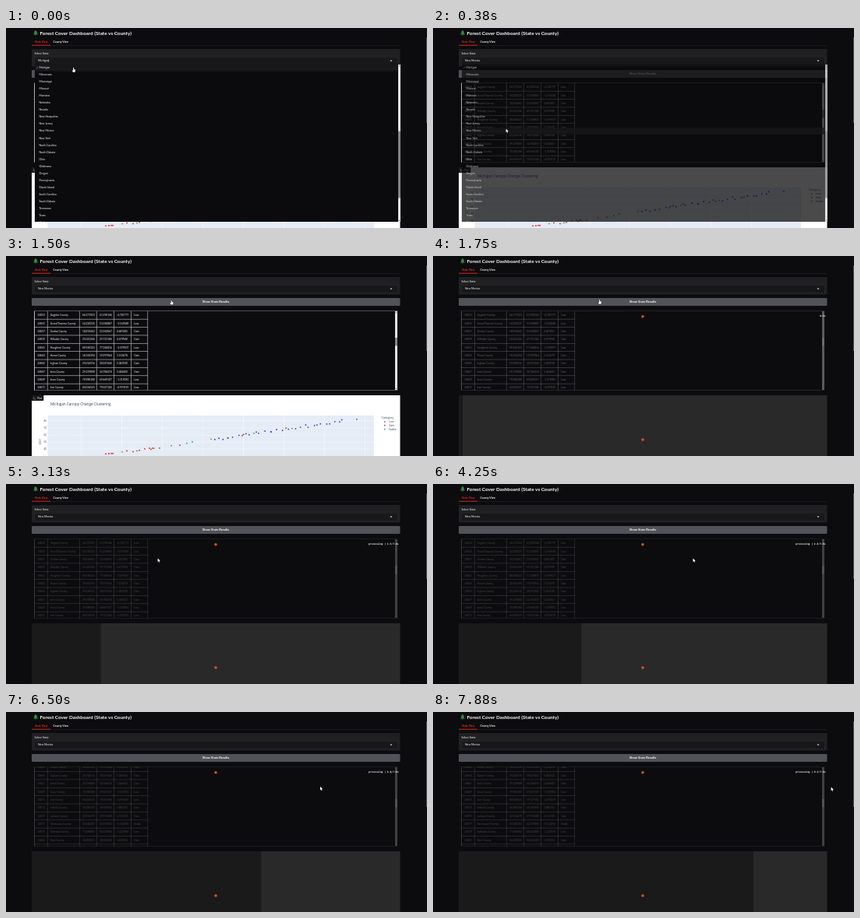
Animation, 540 px wide and 257 px high, one loop 8 s. Source, as an HTML page with a canvas:

```html
<!DOCTYPE html>
<html lang="en">
<head>
<meta charset="utf-8">
<title>Forest Cover Dashboard</title>
<style>
html, body { margin: 0; width: 100%; height: 100%; overflow: hidden; background: #0c0c0f; }
canvas { display: block; width: 540px; height: 257px; }
</style>
</head>
<body>
<canvas id="stage"></canvas>
<script>
const W = 540, H = 257, LOOP = 8000, STEP = 125;
const START = 1667, ETA = 7.76;
const UI = 'Lato, "Open Sans", sans-serif';
const CHART = '"Open Sans", sans-serif';
const MONO = '"DejaVu Sans Mono", "Liberation Mono", monospace';

const canvas = document.getElementById('stage');
const ratio = window.devicePixelRatio || 1;
canvas.width = W * ratio;
canvas.height = H * ratio;
const ctx = canvas.getContext('2d');

const states = ['Michigan', 'Minnesota', 'Mississippi', 'Missouri', 'Montana', 'Nebraska',
  'Nevada', 'New Hampshire', 'New Jersey', 'New Mexico', 'New York', 'North Carolina',
  'North Dakota', 'Ohio', 'Oklahoma', 'Oregon', 'Pennsylvania', 'Rhode Island',
  'South Carolina', 'South Dakota', 'Tennessee', 'Texas', 'Utah'];

// county, cover before, cover after
const counties = [
  ['Gogebic', 66.371923, 61.590146], ['Grand Traverse', 54.220235, 51.050887],
  ['Gratiot', 18.874662, 23.562067], ['Hillsdale', 25.041246, 29.721186],
  ['Houghton', 80.960323, 77.360816], ['Huron', 18.163394, 19.297064],
  ['Ingham', 25.014516, 30.057446], ['Ionia', 29.339808, 34.784410],
  ['Iosco', 70.988188, 69.669107], ['Iron', 84.034525, 79.037106],
  ['Isabella', 34.280194, 38.160946], ['Jackson', 32.916470, 37.071680],
  ['Kalamazoo', 42.260301, 42.097805], ['Kalkaska', 71.446802, 68.223806],
  ['Kent', 36.402815, 38.042648], ['Keweenaw', 86.134210, 83.520164]
];

// time, x, y of the pointer
const path = [
  [0, 87, 54], [125, 88, 66], [375, 95, 132], [625, 124, 137], [875, 142, 122],
  [1375, 212, 60], [1750, 214, 59], [2000, 214, 60], [2500, 196, 98], [3625, 196, 98],
  [4375, 346, 98], [6250, 346, 98], [6875, 512, 99], [8000, 512, 99]
];

function random(seed) {
  return () => (seed = (seed * 16807) % 2147483647) / 2147483647;
}

const dots = (() => {
  const rnd = random(77), list = [];
  const add = (x, color, spread) => list.push({
    x, y: 255.5 - (x - 128) * 0.143 + (rnd() - 0.5) * spread, color
  });
  [128, 132, 135, 137, 155, 163, 171, 178, 184, 186, 188, 197, 223, 303].forEach(x => add(x, '#e8202a', 2.5));
  [149, 168, 190, 212, 232, 239, 263, 285, 318, 367].forEach(x => add(x, '#22b14c', 2.5));
  for (let i = 0; i < 30; i++) add(267 + 168 * (i + rnd()) / 30, '#3c3cd2', 3.5);
  add(450, '#3c3cd2', 1);
  return list;
})();

const clamp = v => Math.max(0, Math.min(1, v));
const ease = v => v * v * (3 - 2 * v);

function rect(x, y, w, h, color) {
  ctx.fillStyle = color;
  ctx.fillRect(x, y, w, h);
}

function round(x, y, w, h, r, color) {
  ctx.fillStyle = color;
  ctx.beginPath();
  ctx.roundRect(x, y, w, h, r);
  ctx.fill();
}

function circle(x, y, r, color) {
  ctx.fillStyle = color;
  ctx.beginPath();
  ctx.arc(x, y, r, 0, Math.PI * 2);
  ctx.fill();
}

function poly(points, color, line) {
  ctx.beginPath();
  points.forEach(([x, y]) => ctx.lineTo(x, y));
  ctx.closePath();
  if (line) {
    ctx.strokeStyle = line;
    ctx.lineWidth = 0.8;
    ctx.stroke();
  }
  ctx.fillStyle = color;
  ctx.fill();
}

// y is the middle of the capitals
function text(str, x, y, size, color = '#f4f4f5', { weight = 400, font = UI, align = 'left' } = {}) {
  ctx.font = `${weight} ${size}px ${font}`;
  ctx.textAlign = align;
  ctx.fillStyle = color;
  ctx.fillText(str, x, y + size * 0.35);
}

function scrollbar(x, top, bottom, thumb, size) {
  rect(x, top, 3, bottom - top, '#e4e4e6');
  rect(x, thumb, 3, size, '#858588');
  poly([[x + 0.5, top + 2.3], [x + 2.5, top + 2.3], [x + 1.5, top + 1]], '#555');
  poly([[x + 0.5, bottom - 2.3], [x + 2.5, bottom - 2.3], [x + 1.5, bottom - 1]], '#555');
}

function header(value) {
  poly([[38, 2.8], [40.4, 6], [39.2, 6], [41, 8.6], [35, 8.6], [36.8, 6], [35.6, 6]], '#2f8f3a');
  rect(37.5, 8.6, 1, 1.2, '#7a4a24');
  text('Forest Cover Dashboard (State vs County)', 43.5, 6.5, 6.35, '#fafafa', { weight: 700 });
  text('State View', 37, 18, 3.4, '#ef2b1d', { weight: 700 });
  text('County View', 60.5, 18, 3.4, '#f4f4f5', { weight: 700 });
  rect(33, 22, 472, 0.5, '#29292d');
  rect(33, 21.7, 24, 0.9, '#e0261b');
  round(33, 27, 472.5, 22.5, 1, '#202023');
  text('Select State', 36.5, 32.3, 3.5);
  round(36.5, 37, 466, 10.3, 1, '#2c2c30');
  round(36.9, 37.4, 465.2, 9.5, 1, '#18181b');
  text(value, 41, 42.1, 3.5);
  poly([[492.7, 41.5], [495.3, 41.5], [494, 43.2]], '#f4f4f5');
  rect(539, 12, 1, 110, '#55555a');
}

function button() {
  round(33, 54, 472.5, 10, 1, '#52525b');
  text('Show State Results', 269.2, 59, 4.05, '#fff', { weight: 700, align: 'center' });
}

function table(scroll, alpha) {
  const rowH = 10.37, top = 70.7, bottom = 172.3;
  ctx.save();
  ctx.globalAlpha = alpha;
  ctx.beginPath();
  ctx.rect(36, 70.3, 467.5, 102.4);
  ctx.clip();
  const line = '#c4c4c8';
  counties.forEach(([name, before, after], i) => {
    const y = 76 + i * rowH - scroll, diff = after - before;
    const kind = Math.abs(diff) < 0.5 ? 'Stable' : diff < 0 ? 'Loss' : 'Gain';
    const cells = [26053 + 2 * i, name + ' County', before.toFixed(6), after.toFixed(6), diff.toFixed(6), kind];
    [40.5, 56.7, 98, 120, 142, 164.3].forEach((x, c) => text(String(cells[c]), x, y, 3.25));
    rect(36.5, y + rowH / 2 - 0.3, 145.5, 0.6, line);
  });
  [53.2, 94.2, 116.2, 138.7, 160.5, 181.8].forEach(x => rect(x - 0.3, top, 0.6, 102, line));
  rect(36.2, top, 0.8, 102, '#e8e8ea');
  rect(36.2, top - 0.3, 466, 0.5, line);
  rect(36.2, bottom - 0.3, 466, 0.5, line);
  scrollbar(499, 71, 172, 105 + scroll * 0.12, 10.5);
  ctx.restore();
}

function plot() {
  rect(33, 179, 472.5, 78, '#fff');
  rect(53.5, 205, 418.5, 52, '#e5ecf6');
  for (let i = 0; i < 5; i++) {
    const y = 212 + i * 9;
    rect(53.5, y - 0.2, 418.5, 0.4, '#fff');
    text(String(80 - i * 10), 52, y, 3, '#2a3f5f', { font: CHART, align: 'right' });
  }
  for (let x = 96; x < 470; x += 52) rect(x, 205, 0.4, 52, '#fff');
  dots.forEach(d => circle(d.x, d.y, 0.9, d.color));
  text('Michigan Canopy Change Clustering', 57, 190, 4.65, '#2a3f5f', { font: CHART });
  ctx.save();
  ctx.translate(43.7, 238.5);
  ctx.rotate(-Math.PI / 2);
  text('2021', 0, 0, 3.4, '#2a3f5f', { font: CHART, align: 'center' });
  ctx.restore();
  text('Category', 481.5, 207.8, 3.75, '#2a3f5f', { font: CHART });
  [['Loss', '#3c3cd2'], ['Gain', '#e8202a'], ['Stable', '#22b14c']].forEach(([name, color], i) => {
    circle(485.7, 213 + i * 4.7, 0.85, color);
    text(name, 491, 213 + i * 4.7, 3.3, '#2a3f5f', { font: CHART });
  });
  round(33, 179, 15.3, 7, [0, 0, 1, 0], '#18181b');
  ctx.strokeStyle = '#d4d4d8';
  ctx.lineWidth = 0.4;
  ctx.beginPath();
  ctx.moveTo(35.7, 181);
  ctx.lineTo(35.7, 184);
  ctx.lineTo(38.3, 184);
  ctx.stroke();
  text('Plot', 40.3, 182.5, 3.2);
}

function progress(time) {
  const spent = (time - START) / 1000;
  rect(33, 179, 472.5, 78, '#29292a');
  rect(33, 179, 472.5 * clamp(spent / ETA), 78, '#1a1a1b');
  const label = spent < 0.15 ? `${spent.toFixed(1)}s` : `processing | ${spent.toFixed(1)}/${ETA.toFixed(1)}s`;
  text(label, 503.5, 77, 3.05, '#fff', { font: MONO, align: 'right', weight: 700 });
  circle(269, 77.8, 1.8, '#d9531e');
  circle(269, 236, 1.8, '#d9531e');
}

function menu(alpha, active) {
  ctx.save();
  ctx.globalAlpha = alpha;
  // drawn as non-overlapping areas, so that fading stays even
  ctx.beginPath();
  ctx.rect(36.7, 46.6, 469.5, 202.4);
  ctx.clip();
  rect(36.7, 46.6, 466.3, 202.4, '#0b0b0d');
  rect(36.7, 46.6 + active * 9.02, 466.3, 9, '#18181a');
  states.forEach((name, i) => text(name, 42.5, 51.1 + i * 9.02, 3.45));
  text('✓', 38.8, 51.1, 3.3, '#f4f4f5', { font: '"DejaVu Sans", sans-serif' });
  scrollbar(503, 47, 249, 132.5, 86);
  ctx.restore();
}

function pointerAt(time) {
  let i = 1;
  while (i < path.length - 1 && path[i][0] <= time) i++;
  const [t0, x0, y0] = path[i - 1], [t1, x1, y1] = path[i];
  const p = ease(clamp((time - t0) / (t1 - t0)));
  return [x0 + (x1 - x0) * p, y0 + (y1 - y0) * p];
}

function pointer(time) {
  const [x, y] = pointerAt(time);
  const hand = time < 375 || (time > 1200 && time < 2200);
  const shape = hand
    ? [[-0.9, -3], [0, -3], [0.2, -1], [1.8, -0.5], [2, 1.2], [1.3, 2.8], [-1, 2.8], [-2.2, 0.7], [-1.8, 0.2], [-0.9, 0.8]]
    : [[-1.4, -2.6], [-1.4, 2], [-0.4, 1.2], [0.4, 2.8], [1.1, 2.5], [0.4, 0.9], [1.8, 0.8]];
  poly(shape.map(([dx, dy]) => [x + dx, y + dy]), '#fff', '#111');
}

function draw(now) {
  const time = Math.floor((now % LOOP) / STEP) * STEP;
  const busy = time >= START;
  const scroll = 56.5 * ease(clamp((time - 5500) / 600));
  const fade = time < 375 ? 1 : time < 500 ? 0.74 : time < 625 ? 0.25 : 0;

  ctx.setTransform(ratio, 0, 0, ratio, 0, 0);
  rect(0, 0, W, H, '#0c0c0f');
  header(time < 375 ? 'Michigan' : 'New Mexico');
  button();
  table(scroll, !busy ? 1 : time < 1875 ? 0.36 : 0.24);
  if (busy) progress(time);
  else plot();
  if (time === 0) rect(54.6, 40.3, 0.4, 3.6, '#f4f4f5');
  if (fade) {
    const row = Math.floor((pointerAt(time)[1] - 46.6) / 9.02);
    menu(fade, Math.max(0, Math.min(9, row)));
  }
  pointer(time);
}

const begin = performance.now();
function tick() {
  draw(performance.now() - begin);
  requestAnimationFrame(tick);
}
tick();
</script>
</body>
</html>
```
